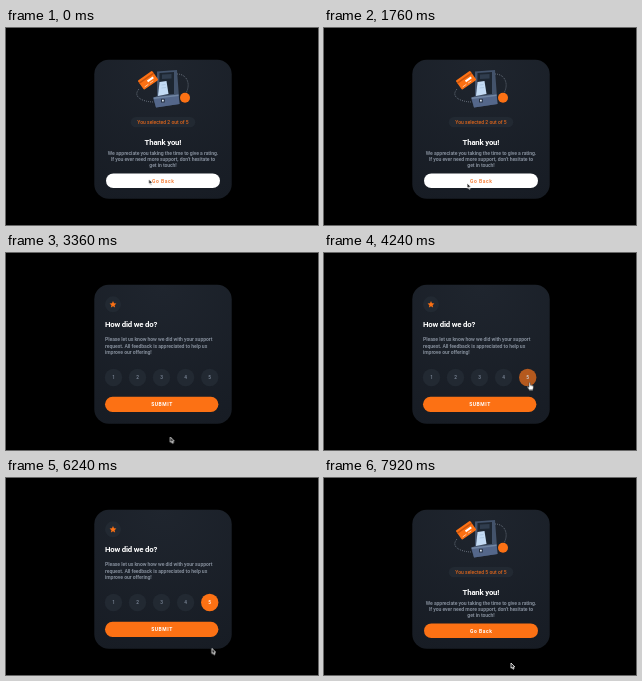
An HTML page for the animation above (8 s loop, 312 by 197 pixels).

```html
<!DOCTYPE html>
<html lang="en">
<head>
<meta charset="utf-8">
<title>Rating card</title>
<style>
  html, body { margin: 0; width: 100%; height: 100%; overflow: hidden; background: #000; }
  svg { display: block; width: 100%; height: 100%; font-family: Roboto, Arial, sans-serif; }

  .title { font-size: 7.8px; font-weight: 700; letter-spacing: -.2px; fill: #fff; }
  .body { font-size: 5.1px; font-weight: 700; letter-spacing: -.08px; fill: #828b98; }
  .pick { font-size: 5px; font-weight: 500; fill: #e0661b; }
  .label { font-size: 5px; font-weight: 700; letter-spacing: .55px; fill: #fff; }
  .num { font-size: 4.8px; font-weight: 500; fill: #7c8798; }
  .mid { text-anchor: middle; }
  .chip { fill: #222932; }
  .btn { fill: #fc7114; }

  /* 1% of the loop is 80 ms */
  .thanks, .rate, .two, .five, .arrow, .hand,
  .back .btn, .back .label, .send .btn, .send .label, .on circle, .on text, .cursor {
    animation: 8s linear infinite;
  }
  .thanks, .rate, .two, .five, .arrow, .hand { animation-timing-function: step-end; }
  .thanks { animation-name: thanks; }
  .rate { animation-name: rate; }
  .two { animation-name: two; }
  .five { animation-name: five; }
  .arrow { animation-name: arrow; }
  .hand { animation-name: hand; }
  .back .btn { animation-name: backFill; }
  .back .label { animation-name: backText; }
  .send .btn { animation-name: sendFill; }
  .send .label { animation-name: sendText; }
  .on circle { animation-name: onFill; }
  .on text { animation-name: onText; }
  .cursor { animation-name: move; animation-timing-function: ease-in-out; }

  @keyframes thanks { 0%, 84.5% { opacity: 1 } 34%, 84.4% { opacity: 0 } }
  @keyframes rate { 0%, 84.5% { opacity: 0 } 34%, 84.4% { opacity: 1 } }
  @keyframes two { 0% { opacity: 1 } 50%, 100% { opacity: 0 } }
  @keyframes five { 0% { opacity: 0 } 50%, 100% { opacity: 1 } }
  @keyframes arrow { 0%, 72% { opacity: 1 } 52% { opacity: 0 } }
  @keyframes hand { 0%, 72% { opacity: 0 } 52% { opacity: 1 } }

  @keyframes backFill {
    0%, 5%, 21%, 34%, 89%, 93.5% { fill: #fff }
    8%, 18.5%, 35%, 86%, 96.5%, 100% { fill: #fc7114 }
  }
  @keyframes backText {
    0%, 5%, 21%, 34%, 89%, 93.5% { fill: #f4833f }
    8%, 18.5%, 35%, 86%, 96.5%, 100% { fill: #fff }
  }
  @keyframes sendFill {
    0%, 79.5%, 85%, 100% { fill: #fc7114 }
    82%, 84.5% { fill: #fff }
  }
  @keyframes sendText {
    0%, 79.5%, 85%, 100% { fill: #fff }
    82%, 84.5% { fill: #f4833f }
  }
  @keyframes onFill {
    0%, 51% { fill: #222932 }
    54%, 100% { fill: #fc7114 }
  }
  @keyframes onText {
    0%, 51% { fill: #7c8798 }
    54%, 100% { fill: #fff }
  }
  @keyframes move {
    0%, 3% { transform: translate(142.7px, 151px) }
    10%, 15% { transform: translate(155.7px, 176.5px) }
    23%, 35% { transform: translate(142.7px, 154.3px) }
    43% { transform: translate(165px, 185px); animation-timing-function: linear }
    47% { transform: translate(205px, 183px); animation-timing-function: linear }
    50% { transform: translate(235px, 162px) }
    53%, 57% { transform: translate(205px, 129.5px) }
    66%, 70% { transform: translate(209.3px, 129.3px) }
    73% { transform: translate(229px, 146px); animation-timing-function: linear }
    77% { transform: translate(208px, 172px) }
    82%, 91% { transform: translate(183.2px, 152.7px) }
    98%, 100% { transform: translate(187px, 185px) }
  }
</style>
</head>
<body>
<svg viewBox="0 0 312 197">
  <defs>
    <radialGradient id="bg" cx=".5" cy="0" r="1.1">
      <stop offset="0" stop-color="#1f252e"/>
      <stop offset="1" stop-color="#171c24"/>
    </radialGradient>
  </defs>
  <rect width="312" height="197" fill="#000"/>
  <rect x="88.3" y="31.7" width="137.4" height="139" rx="14.5" fill="url(#bg)"/>

  <g class="thanks">
    <g fill="none" stroke="#8d97a5" stroke-width=".7" stroke-dasharray=".9 1.1">
      <path d="M133 61C126 69 137 74 148 74"/>
      <path d="M171 46C181 46 185 56 180 65"/>
    </g>
    <path d="M151 43.5L171 42L173.5 76L150 79.5L147 70L151 68Z" fill="#43536b"/>
    <path d="M153.5 45L168 44V66L153 67.5Z" fill="#1d2631"/>
    <path d="M156 46.5L165.5 46V50.5L156 51Z" fill="#303d4e"/>
    <path d="M153.5 54L160.5 53L162.5 66L152 68Z" fill="#c3dbf4"/>
    <path d="M155.5 57L159.5 56.5M155.5 60L160 59.5" stroke="#9bb6d3" stroke-width=".5"/>
    <path d="M147.5 69.5L172.5 66.5L173.5 76L150 79.5Z" fill="#54678a"/>
    <path d="M147.5 69.5L172.5 66.5V68L148 71Z" fill="#7186a3"/>
    <rect x="155" y="70.8" width="3.8" height="3.6" rx=".5" fill="#263142"/>
    <rect x="156" y="71.7" width="1.8" height="1.8" fill="#dce6f0"/>
    <g transform="translate(142 52.3) rotate(-35)">
      <rect x="-8.8" y="-5.6" width="17.6" height="11.2" rx="1" fill="#fc7114"/>
      <rect x="-8.8" y="-3.4" width="17.6" height="1.6" fill="#c9540d"/>
      <rect x="-1" y="-.4" width="7" height="2" fill="#fff"/>
      <path d="M-6.5 3.5H-2M0 3.5H4" stroke="#ffd0ad" stroke-width=".8"/>
    </g>
    <circle cx="179" cy="69.8" r="5" fill="#fc7114"/>

    <rect class="chip" x="124.7" y="89" width="64.6" height="10.3" rx="5.15"/>
    <g class="pick mid">
      <text class="two" x="157" y="95.8">You selected 2 out of 5</text>
      <text class="five" x="157" y="95.8">You selected 5 out of 5</text>
    </g>
    <text class="title mid" x="156.9" y="117.1">Thank you!</text>
    <g class="body mid">
      <text x="157" y="126.8">We appreciate you taking the time to give a rating.</text>
      <text x="157" y="133">If you ever need more support, don’t hesitate to</text>
      <text x="157" y="139.2">get in touch!</text>
    </g>
    <g class="back">
      <rect class="btn" x="100" y="145.4" width="114" height="14.7" rx="7.35"/>
      <text class="label mid" x="157.2" y="154.5">Go Back</text>
    </g>
  </g>

  <g class="rate">
    <circle class="chip" cx="107" cy="51.3" r="8"/>
    <path transform="translate(107 51.5)" fill="#fc7114"
      d="M0-3.4L1-1.2L3.4-1L1.6.7L2.1 3L0 1.8L-2.1 3L-1.6.7L-3.4-1L-1-1.2Z"/>
    <text class="title" x="99" y="74.1">How did we do?</text>
    <g class="body">
      <text x="99" y="88.4">Please let us know how we did with your support</text>
      <text x="99" y="94.9">request. All feedback is appreciated to help us</text>
      <text x="99" y="101.4">improve our offering!</text>
    </g>
    <g class="mid">
      <circle class="chip" cx="107.5" cy="124.5" r="8.7"/><text class="num" x="107.5" y="126.2">1</text>
      <circle class="chip" cx="131.5" cy="124.5" r="8.7"/><text class="num" x="131.5" y="126.2">2</text>
      <circle class="chip" cx="155.5" cy="124.5" r="8.7"/><text class="num" x="155.5" y="126.2">3</text>
      <circle class="chip" cx="179.6" cy="124.5" r="8.7"/><text class="num" x="179.6" y="126.2">4</text>
      <g class="on"><circle class="chip" cx="203.7" cy="124.5" r="8.7"/><text class="num" x="203.7" y="126.2">5</text></g>
    </g>
    <g class="send">
      <rect class="btn" x="99" y="143.7" width="113.4" height="15.2" rx="7.6"/>
      <text class="label mid" x="156" y="153.2">SUBMIT</text>
    </g>
  </g>

  <g class="cursor" stroke-linejoin="round">
    <path class="arrow" d="M0 0V5.2L1.2 4.2L2 6.2L3 5.8L2.3 3.9H3.8Z" fill="#111" stroke="#fff" stroke-width=".8"/>
    <path class="hand" d="M0 .3Q.7-.5 1.3.3V2.6L4 3.2Q4.7 3.5 4.5 4.5L3.9 7.5H.3L-1.9 4.6Q-1.6 3.6-.6 4.3L0 4.8Z"
      fill="#fff" stroke="#222" stroke-width=".5"/>
  </g>
</svg>
</body>
</html>
```
